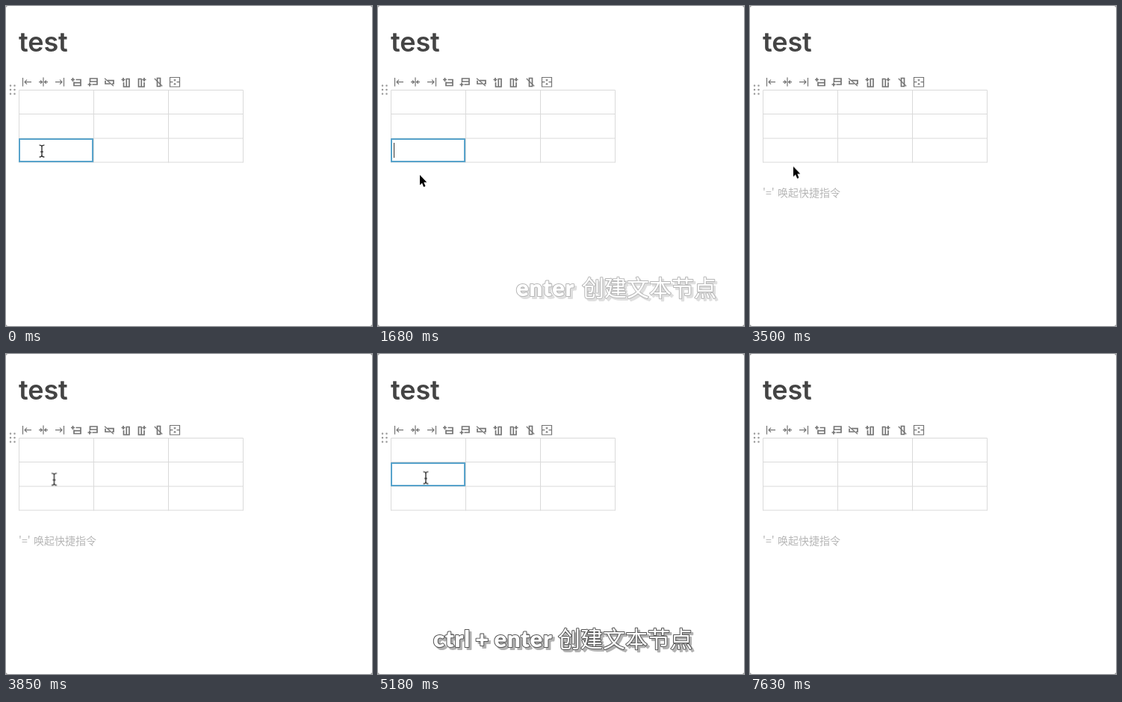
Animation, 490 px wide and 428 px high, one loop 7.91 s. Source, as an HTML page:

```html
<!DOCTYPE html>
<html lang="zh-CN">
<head>
<meta charset="utf-8">
<title>Table editing</title>
<style>
  html, body { margin: 0; width: 100%; height: 100%; overflow: hidden; background: #8a8a8a; }
  svg { display: block; width: 490px; height: 428px; background: #fff; border-radius: 3px; }

  .title { font: 600 36px Inter, "Open Sans", sans-serif; letter-spacing: -.1px; fill: #444; }
  .hint { font: 14px "Noto Sans CJK SC", "Noto Sans CJK", sans-serif; fill: #b6b6b6; }
  .icons { fill: none; stroke: #747474; stroke-width: 1.2; }
  .icons .bold { stroke-width: 1.7; }
  .grid { fill: none; stroke: #dadada; }
  .cell { fill: none; stroke: #58a3cb; stroke-width: 2; }
  .caret { fill: #333; }
  .caret.para { fill: #444480; }
  .caption { font: 900 31px Lato, "Open Sans", sans-serif; letter-spacing: .75px; word-spacing: -1.5px;
    filter: drop-shadow(3px 3px .5px #b2b2b2); }
  .caption text { fill: #fff; stroke: #555; stroke-width: 2; stroke-linejoin: round; paint-order: stroke; }
  .caption .han { font: 500 30px "Noto Sans CJK SC", "Noto Sans CJK", sans-serif; letter-spacing: 0; }
  .beam path { fill: none; stroke: #111; stroke-width: 1.2; }
  .beam .halo { stroke: #fff; stroke-width: 2.4; }
  .arrow { fill: #000; stroke: #fff; stroke-width: 1.2; paint-order: stroke; }

  .cell, .caret, .hint, .caption, .beam, .arrow {
    animation: 7910ms step-end infinite;
  }
  .cell.low { animation-name: cell-low; }
  .cell.mid { animation-name: cell-mid; }
  .caret.low { animation-name: caret-low; }
  .caret.mid { animation-name: caret-mid; }
  .caret.para { animation-name: caret-para; }
  .hint { animation-name: hint; }
  .caption.one { animation-name: caption-one; }
  .caption.two { animation-name: caption-two; }
  .beam { animation-name: beam; }
  .arrow { animation-name: arrow; }

  @keyframes cell-low { 0% { opacity: 1 } 23.89%, 100% { opacity: 0 } }
  @keyframes cell-mid { 0%, 86.72%, 100% { opacity: 0 } 53.09% { opacity: 1 } }
  @keyframes caret-low {
    0%, 12.38%, 23.89%, 100% { opacity: 0 }
    5.3%, 18.58% { opacity: 1 }
  }
  @keyframes caret-mid {
    0%, 60.17%, 73.45%, 86.72%, 100% { opacity: 0 }
    53.09%, 66.37%, 79.64% { opacity: 1 }
  }
  @keyframes caret-para {
    0%, 30.97%, 43.36%, 53.09%, 94.69%, 100% { opacity: 0 }
    24.77%, 37.16%, 50.44%, 87.61% { opacity: 1 }
  }
  @keyframes hint {
    0%, 53.09% { opacity: 0 }
    23.89%, 86.72%, 100% { opacity: 1 }
  }
  @keyframes caption-one {
    0% { opacity: 0; transform: none }
    21.23% { opacity: .42; transform: translateX(13px) }
    22.12% { opacity: 1; transform: none }
    39.82% { opacity: .7; transform: none }
    40.7% { opacity: .35; transform: none }
    41.59%, 100% { opacity: 0; transform: none }
  }
  @keyframes caption-two {
    0% { opacity: 0; transform: none }
    64.6% { opacity: .8; transform: translateX(4px) }
    65.48% { opacity: 1; transform: none }
    94.69% { opacity: .7; transform: none }
    95.57% { opacity: .35; transform: none }
    96.46%, 100% { opacity: 0; transform: none }
  }
  @keyframes beam {
    0% { opacity: 1; transform: translate(48px, 194px) }
    2.65% { opacity: 1; transform: translate(48px, 189px) }
    3.53% { opacity: 1; transform: translate(48px, 177px) }
    4.42% { opacity: 1; transform: translate(48px, 168px) }
    8.84% { opacity: 1; transform: translate(48px, 176px) }
    9.73% { opacity: 1; transform: translate(50px, 197px) }
    10.61% { opacity: 0; transform: translate(60px, 204px) }
    45.13% { opacity: 1; transform: translate(60px, 204px); animation-timing-function: steps(4) }
    48.67% { opacity: 1; transform: translate(64.5px, 167.5px) }
    49.55% { opacity: 1; transform: translate(64px, 165.5px) }
    86.72%, 100% { opacity: 0; transform: translate(64px, 165.5px) }
  }
  @keyframes arrow {
    0% { opacity: 0; transform: translate(54px, 218px) }
    10.61% { opacity: 1; transform: translate(54px, 218px) }
    11.5% { opacity: 1; transform: translate(56px, 226px) }
    23.89% { opacity: 0; transform: translate(56px, 226px) }
    42.47% { opacity: 1; transform: translate(56px, 226px); animation-timing-function: steps(3) }
    45.12% { opacity: 1; transform: translate(59px, 209px) }
    45.13%, 100% { opacity: 0; transform: translate(59px, 209px) }
  }
</style>
</head>
<body>
<svg viewBox="0 0 490 428">
  <defs>
    <path id="ibeam" d="M-3.5-8Q0-8 0-5.5V5.5Q0 8-3.5 8M3.5-8Q0-8 0-5.5M0 5.5Q0 8 3.5 8M-2 1H2"/>
  </defs>

  <text class="title" x="17" y="61">test</text>

  <!-- drag handle -->
  <path d="M6 106.5v.01M11.5 106.5v.01M6 112v.01M11.5 112v.01M6 117.5v.01M11.5 117.5v.01"
    stroke="#999" stroke-width="2.5" stroke-linecap="round"/>

  <g class="icons">
    <!-- align left, centre, right -->
    <path d="M22.5 96v11.5M34 101.7h-9M28 98.7l-3 3 3 3"/>
    <path d="M50 95.5v12M44 101.7h4.5M46 99.5l2.4 2.2-2.4 2.2M56 101.7h-4.5M54 99.5l-2.4 2.2 2.4 2.2"/>
    <path d="M77.5 96v11.5M66 101.7h9M72 98.7l3 3-3 3"/>
    <!-- rows -->
    <path class="bold" d="M93.5 98.5h6.5v8h-9v-5M91 102.7h9M87 98.5h5M89.5 96v5"/>
    <path class="bold" d="M112.5 102v-5h9.5v8h-6.5M112.5 101h9.5M109.5 105h5M112 102.5v5"/>
    <path class="bold" d="M136 99.7h8v4.3h-2M139.5 104h-6.5v-4.3"/>
    <path d="M132 96.8l12 10.2"/>
    <!-- columns -->
    <path class="bold" d="M160.5 97.5h4.5v10.5h-7.5v-6M161.3 97.5v10.5M154.5 98.5h5M157 96v5"/>
    <path class="bold" d="M181.5 97.5h-4v10.5h7.5v-6M181.3 97.5v10.5M182.5 98.5h5M185 96v5"/>
    <path class="bold" d="M202.5 96.5h4v11h-4z"/>
    <path d="M198.8 97l10.4 10.2"/>
    <!-- merge -->
    <path d="M219.5 95.5h13v12.5h-13zM219.5 101.7h4M228.5 101.7h4M226 98v2.5M226 103v2.5M224.5 99h3M224.5 104.5h3"/>
  </g>

  <path class="grid" d="M17.5 112.5h300M17.5 144.5h300M17.5 177h300M17.5 209h300
    M17.5 112.5v97M117.5 112.5v97M217.5 112.5v97M317.5 112.5v97"/>
  <rect class="cell low" x="18" y="178" width="98" height="30"/>
  <rect class="cell mid" x="18" y="146" width="98" height="30"/>

  <g class="hint">
    <text x="17" y="255">'='</text>
    <text x="37" y="255">唤起快捷指令</text>
  </g>

  <rect class="caret low" x="21" y="183" width="1" height="20"/>
  <rect class="caret mid" x="21" y="151" width="1" height="20"/>
  <rect class="caret para" x="17" y="240" width="1" height="20"/>

  <g class="caption one">
    <text x="172" y="388">enter</text>
    <text class="han" x="260" y="388">创建文本节点</text>
  </g>
  <g class="caption two">
    <text x="74" y="392">ctrl + enter</text>
    <text class="han" x="241" y="392">创建文本节点</text>
  </g>

  <g class="beam">
    <path class="halo" d="M0-8V8"/>
    <use href="#ibeam" fill="none" stroke="#111" stroke-width="1.2"/>
  </g>
  <path class="arrow" d="M0 0V13.5L3 10.7L5.2 16L7.5 15L5.3 9.8H9.3Z"/>
</svg>
</body>
</html>
```
